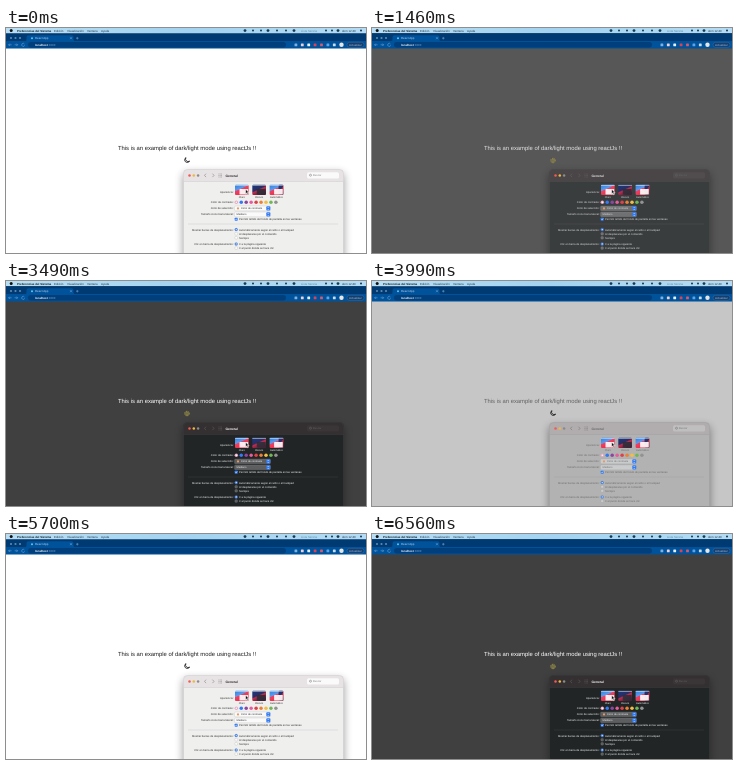
An HTML page for the animation above (6630 ms loop, 360x225 px).

```html
<!DOCTYPE html>
<html lang="es">
<meta charset="utf-8">
<title>Dark / light mode</title>
<style>
  html, body { margin: 0; height: 100%; overflow: hidden; background: var(--page); }
  svg { display: block; width: 100vw; height: 100vh; }
  text { font: 2.9px "Liberation Sans", Arial, sans-serif; text-rendering: geometricPrecision; }
  .bold { font-weight: bold; }
  .page { fill: var(--page); }
  .ink { fill: var(--ink); }
  .label { fill: var(--label); }
  .win { fill: var(--win); }
  .bar { fill: var(--bar); }
  .field { fill: var(--field); }
  .search { fill: var(--search); }
  .line { stroke: var(--line); stroke-width: .5; fill: none; }
  .dim { fill: var(--dim); }
  .mark { fill: none; stroke: var(--dim); stroke-width: .6; }
  .tool { fill: none; stroke: #7fb0dd; stroke-width: .5; }
</style>
<svg id="stage" viewBox="0 0 360 225">
  <defs>
    <linearGradient id="sky"><stop stop-color="#b9def3"/><stop offset=".5" stop-color="#a3d3f0"/><stop offset="1" stop-color="#b4dcf4"/></linearGradient>
    <linearGradient id="day" x2=".6" y2="1"><stop stop-color="#2f7fe0"/><stop offset=".45" stop-color="#5c9bec"/><stop offset=".5" stop-color="#f0405f"/><stop offset="1" stop-color="#e62d4c"/></linearGradient>
    <linearGradient id="night" x2=".6" y2="1"><stop stop-color="#173a80"/><stop offset=".5" stop-color="#2a2d65"/><stop offset=".6" stop-color="#c02c4a"/><stop offset="1" stop-color="#5b1838"/></linearGradient>
    <filter id="blur" x="-20%" y="-20%" width="140%" height="140%"><feGaussianBlur stdDeviation="4"/></filter>
  </defs>

  <rect class="page" width="360" height="225"/>
  <text class="ink" x="181" y="122" text-anchor="middle" style="font-size:5.86px">This is an example of dark/light mode using reactJs !!</text>
  <path id="moon" d="M180 129.6a2.6 2.6 0 1 0 3.6 3.4a2.5 2.5 0 0 1-3.6-3.4z" fill="none" stroke="#111" stroke-width=".8"/>
  <g id="sun" fill="none" stroke="#c4b548">
    <circle cx="181" cy="132.5" r="1" stroke-width=".6"/>
    <circle cx="181" cy="132.5" r="2.2" stroke-width=".9" stroke-dasharray="1.1 .628"/>
  </g>

  <!-- menu bar and browser -->
  <rect width="360" height="5.2" fill="url(#sky)"/>
  <rect y="5.2" width="360" height="8" fill="#003a72"/>
  <rect y="13" width="360" height="7.5" fill="#00529b"/>
  <path d="M19 13.2q1.5 0 1.5-2v-2q0-2 2-2h43q2 0 2 2v2q0 2 1.5 2z" fill="#00529b"/>
  <rect x="22" y="14" width="258" height="5.5" rx="2.75" fill="#003f7c"/>
  <g id="chrome">
    <circle cx="5.2" cy="2.6" r="1.5" fill="#111"/>
    <circle cx="26" cy="10.2" r="1" fill="#61c8e8"/>
    <path class="tool" d="M64 9.2l2 2m0-2l-2 2M70 10.2h2.6m-1.3-1.3v2.6M5.6 16.8h-3l1.2-1.2m-1.2 1.2l1.2 1.2M8.6 16.8h3l-1.2-1.2m1.2 1.2l-1.2 1.2M18.4 16a1.5 1.5 0 1 0 .2 1.3"/>
    <rect x="341" y="14.3" width="17" height="5" rx="2.5" fill="#123e70" stroke="#5d8dbd" stroke-width=".3"/>
  </g>

  <!-- preferences window -->
  <rect x="177" y="145" width="161" height="90" rx="4" opacity=".38" filter="url(#blur)"/>
  <rect class="win" x="177.5" y="141.5" width="160" height="92" rx="4"/>
  <path class="bar" d="M177.5 153.5v-8q0-4 4-4h152q4 0 4 4v8z"/>
  <path class="line" d="M177.5 153.5h160M182 196h150"/>
  <rect class="line" x="177.5" y="141.5" width="160" height="92" rx="4"/>
  <path class="mark" d="M200 145.7l-1.5 1.7l1.5 1.7M206.5 145.7l1.5 1.7l-1.5 1.7"/>
  <path class="mark" d="M212.5 146h3.5m-3.5 1.5h3.5m-3.5 1.5h3.5" stroke-dasharray=".8 .5"/>
  <rect class="search" x="301" y="144.3" width="32" height="6.2" rx="1.5"/>
  <circle class="mark" cx="304.5" cy="147.2" r="1"/>
  <g id="prefs"></g>
  <path d="M239.5 161v5l1.2-1.1l.8 1.8l.8-.4l-.8-1.7h1.5z" fill="#111" stroke="#fff" stroke-width=".6"/>
</svg>
<script>
  const LOOP = 6630, FADE = 500;
  const SWITCHES = [[1165, 1], [3785, 0], [5825, 1]];
  // name: [light, dark]
  const COLORS = {
    page: [[255, 255, 255], [64, 64, 64]],
    ink: [[30, 30, 30], [255, 255, 255]],
    label: [[45, 45, 45], [250, 250, 250]],
    win: [[239, 239, 237], [33, 37, 38]],
    bar: [[231, 226, 228], [52, 47, 48]],
    field: [[250, 250, 250], [92, 94, 96]],
    search: [[250, 250, 250], [58, 53, 54]],
    line: [[205, 203, 204], [60, 61, 62]],
    dim: [[130, 130, 130], [98, 96, 97]]
  };
  const $ = id => document.getElementById(id);

  function add(parent, tag, attrs, content = '') {
    const node = document.createElementNS('http://www.w3.org/2000/svg', tag);
    for (const key in attrs) node.setAttribute(key, attrs[key]);
    node.textContent = content;
    parent.append(node);
  }
  const chrome = $('chrome'), prefs = $('prefs');
  const label = (x, y, s, size = 2.7, more = {}) =>
    add(prefs, 'text', { class: 'label', x, y, style: `font-size:${size}px`, ...more }, s);
  const dot = (parent, cx, cy, r, fill, more = {}) => add(parent, 'circle', { cx, cy, r, fill, ...more });
  const box = (x, y, width, height, fill, more = {}) => add(prefs, 'rect', { x, y, width, height, fill, ...more });

  function buildChrome() {
    const write = (x, y, s, fill, cls = '') => add(chrome, 'text', { x, y, fill, class: cls }, s);
    write(11, 3.5, 'Preferencias del Sistema', '#0c1c28', 'bold');
    [[48, 'Edición'], [61, 'Visualización'], [81, 'Ventana'], [95, 'Ayuda']]
      .forEach(([x, s]) => write(x, 3.5, s, '#1b3344'));
    write(295, 3.5, 'Lista Serena', '#5d8aa5');
    write(336, 3.5, 'dom 12:40', '#1b3344');
    write(29, 11.2, 'React App', '#c4d8ec');
    write(29, 17.8, 'localhost', '#fff', 'bold');
    write(42, 17.8, ':3000', '#7fa6cc');
    write(343, 17.8, 'Actualizar', '#a9bfd6');
    [5, 9.5, 14].forEach(x => dot(chrome, x, 10, 1.1, '#5f89b0'));
    [239, 247, 255, 262, 271, 280, 288, 320, 326, 332, 355]
      .forEach((x, i) => dot(chrome, x, 2.6, i % 3 ? 1 : 1.4, '#17384f'));
    ['#7fb0e0', '#f0d0d4', '#e8f0f8', '#e04050', '#d8586c', '#5ca4e8', '#c8dcef']
      .forEach((c, i) => add(chrome, 'rect', { x: 288.5 + i * 6.4, y: 15.5, width: 2.8, height: 2.8, rx: .6, fill: c }));
    dot(chrome, 335.5, 16.8, 2.2, '#e8e5e2');
  }

  function buildPrefs() {
    ['#f25b55', '#f0b840', '#8b8b8b'].forEach((c, i) => dot(prefs, 183.5 + i * 4.3, 147.4, 1.25, c));
    label(219.5, 148.6, 'General', 3.3, { class: 'label bold' });
    label(307, 148.3, 'Buscar', 2.7, { class: 'dim' });

    [[165, 'Apariencia:'], [175.2, 'Color de contraste:'], [181.3, 'Color de selección:'],
     [187.2, 'Tamaño icono barra lateral:'], [202.8, 'Mostrar barras de desplazamiento:'],
     [217.2, 'Clic en barra de desplazamiento:']]
      .forEach(([y, s]) => label(227.5, y, s, 2.7, { 'text-anchor': 'end' }));

    ['Claro', 'Oscuro', 'Automático'].forEach((s, i) => {
      const x = 229 + i * 17.3;
      box(x, 156.7, 13.7, 10.3, `url(#${i == 1 ? 'night' : 'day'})`, { rx: 1 });
      if (i == 2) box(x + 9, 156.7, 4.7, 10.3, 'url(#night)', { rx: 1 });
      box(x, 156.9, 13.7, 1, '#fff', { opacity: .5 });
      box(x + 4.5, 161, 8.7, 5.5, i == 1 ? '#2b2f38' : '#fff', { opacity: .9, rx: .5 });
      label(x + 6.8, 170, s, 2.6, { 'text-anchor': 'middle' });
    });

    ['#e9a9c4', '#3478f6', '#8d46a0', '#e65c9c', '#df4149', '#ed8035', '#f3be43', '#70b853', '#929292']
      .forEach((c, i) => dot(prefs, 230.3 + i * 4.95, 174.2, 1.75, c));
    dot(prefs, 230.3, 174.2, .7, '#fff');

    [[178, 'Color de contraste'], [184, 'Mediano']].forEach(([y, s], i) => {
      box(228.5, y, 36, 4.8, '', { class: 'field', rx: 1, stroke: '#999', 'stroke-width': .2 });
      box(260.3, y + .3, 4, 4.2, '#347cf3', { rx: .9 });
      add(prefs, 'path', { d: `M261.5 ${y + 2}l.8-.9l.8.9m0 1l-.8.9l-.8-.9`, fill: 'none', stroke: '#fff', 'stroke-width': .4 });
      if (!i) dot(prefs, 232, y + 2.4, 1.1, '#eb9860');
      label(i ? 230.5 : 235, y + 3.3, s, 2.6);
    });

    box(228.7, 189.7, 3, 3, '#347cf3', { rx: .6 });
    add(prefs, 'path', { d: 'M229.4 191.2l.7.8l1-1.5', fill: 'none', stroke: '#fff', 'stroke-width': .45 });
    label(233, 192.2, 'Permitir teñido del fondo de pantalla en las ventanas');

    [[201.6, 'Automáticamente según el ratón o el trackpad', 1], [205.7, 'Al desplazarse por el contenido'],
     [209.8, 'Siempre'], [215.9, 'Ir a la página siguiente', 1], [220.1, 'Ir al punto donde se hace clic']]
      .forEach(([y, s, on]) => {
        dot(prefs, 230.2, y, 1.5, on ? '#347cf3' : '', { class: on ? '' : 'field', stroke: '#8c8c8c', 'stroke-width': .2 });
        if (on) dot(prefs, 230.2, y, .55, '#fff');
        label(233, y + 1, s);
      });
  }

  // CSS "ease" curve, solved by bisection
  function ease(x) {
    if (x <= 0 || x >= 1) return x <= 0 ? 0 : 1;
    const curve = (a, b, u) => 3 * a * u * (1 - u) ** 2 + 3 * b * u * u * (1 - u) + u ** 3;
    let lo = 0, hi = 1;
    for (let i = 0; i < 20; i++) {
      const mid = (lo + hi) / 2;
      if (curve(.25, .25, mid) < x) lo = mid; else hi = mid;
    }
    return curve(.1, 1, lo);
  }

  function draw(now) {
    const t = now % LOOP;
    let dark = 0, goal = 0;
    for (const [start, to] of SWITCHES) {
      if (t < start) break;
      goal = to;
      dark += (to - dark) * ease((t - start) / FADE);
    }
    for (const name in COLORS) {
      const [a, b] = COLORS[name];
      const rgb = a.map((v, i) => Math.round(v + (b[i] - v) * dark));
      document.documentElement.style.setProperty('--' + name, `rgb(${rgb})`);
    }
    $('moon').style.opacity = goal ? 1 - dark : 1;
    $('sun').style.opacity = goal ? dark : 0;
    requestAnimationFrame(() => draw(performance.now()));
  }

  buildChrome();
  buildPrefs();
  draw(performance.now());
</script>
</html>
```
